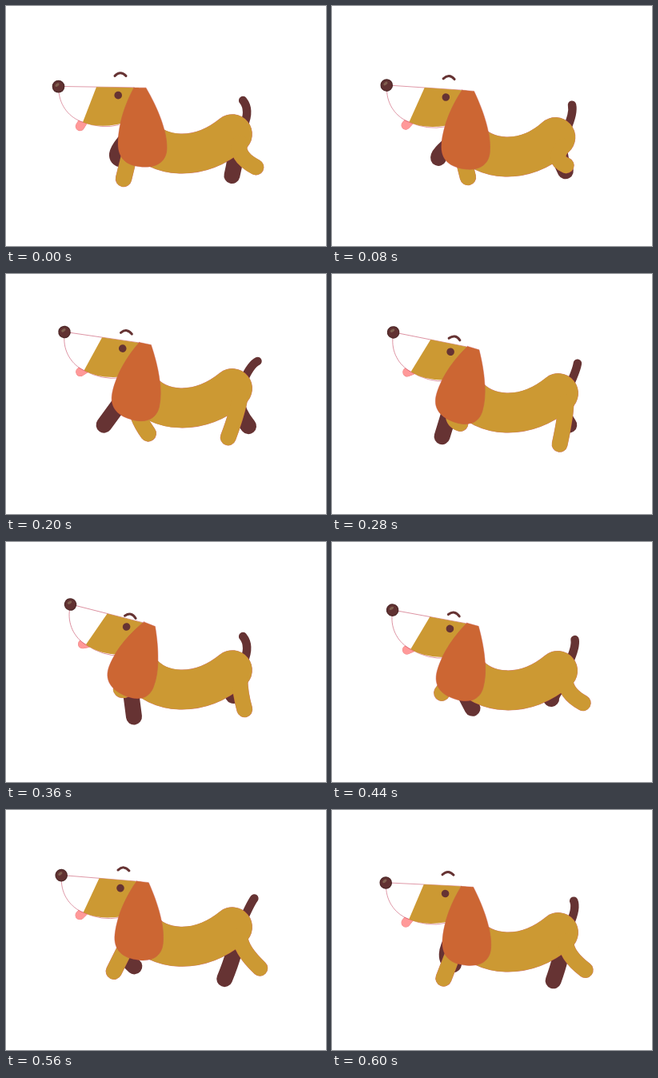
An HTML page with a canvas for the animation above (0.64 s loop, 400 by 300 pixels).

```html
<!DOCTYPE html>
<html lang="en">
<head>
<meta charset="utf-8">
<title>Walking dachshund</title>
<style>
  html, body { margin: 0; width: 100%; height: 100%; overflow: hidden; background: #fff; }
  canvas { display: block; width: 400px; height: 300px; }
</style>
</head>
<body>
<canvas id="stage" width="400" height="300"></canvas>
<script>
const ctx = document.getElementById('stage').getContext('2d');
const LOOP = 640, STEP = 40, FIRST_STRIDE = 360;
const GOLD = '#cc9933', RUST = '#cc6633', DARK = '#663333', PINK = '#ff9999';
const EDGE = 'rgba(190,50,80,0.7)';

// Each foot runs round a closed curve through five evenly timed points.
const NEAR_HIND = [[312.5, 201.5], [279, 199], [285.5, 213], [311, 203], [317, 197]];
const FAR_HIND = [[284, 192], [272, 198.5], [275, 213], [291, 207], [303, 189]];
const NEAR_FORE = [[147, 216], [183, 208], [159, 186], [140, 187.5], [133, 196]];
const FAR_FORE = [[160, 218.5], [177, 202.5], [155, 194], [134, 190], [123.5, 190]];

const wave = turns => Math.cos(turns * 2 * Math.PI);
const bump = turns => Math.max(0, wave(turns));
const frac = x => x - Math.floor(x);

// Position on a closed Catmull-Rom curve, phase 0..1.
function along(points, phase) {
  const n = points.length, i = Math.floor(phase * n), u = phase * n - i;
  const at = k => points[(i + k + n) % n];
  return [0, 1].map(c => {
    const [p, a, b, q] = [at(-1)[c], at(0)[c], at(1)[c], at(2)[c]];
    return a + u / 2 * (b - p + u * (2 * p - 5 * a + 4 * b - q + u * (3 * (a - b) + q - p)));
  });
}

// Quick drop, slower rise, once per stride.
function bobAt(stride) {
  const peak = 0.19, drop = 0.36;
  const s = frac(stride - peak);
  const turns = s < drop ? s / drop / 2 : 0.5 + (s - drop) / (1 - drop) / 2;
  return -6.25 + 10.75 * wave(turns);
}

function stroke(path, color, width) {
  ctx.strokeStyle = color;
  ctx.lineWidth = width;
  ctx.stroke(path);
}

function fill(path, color) {
  ctx.fillStyle = color;
  ctx.fill(path);
}

function dot(x, y, r, color) {
  const p = new Path2D();
  p.arc(x, y, r, 0, 7);
  fill(p, color);
}

function turn(deg, x, y) {
  ctx.translate(x, y);
  ctx.rotate(deg * Math.PI / 180);
  ctx.translate(-x, -y);
}

const bend = (x, y, kx, ky, fx, fy) => new Path2D(`M${x} ${y}Q${kx} ${ky} ${fx} ${fy}`);

function hindLeg(x, y, points, phase) {
  const knee = -14 * bump(phase - 0.12) ** 3;
  return bend(x, y, x + knee, y + 17, ...along(points, phase));
}

function foreLeg(x, y, points, phase) {
  const [fx, fy] = along(points, phase);
  const knee = 18 * bump(phase - 0.47);
  return bend(x, y, (x + fx) / 2 - knee, (y + fy) / 2 + knee * 0.6, fx, fy);
}

const MUZZLE = new Path2D('M65 100L114 101L97 145C80 140 67 125 66 106Z');
const OUTLINE = new Path2D('M160 101.7L65 100.3M66 106C67 125 80 140 96 145Q120 154 141 148.5');
const FACE = new Path2D('M113 101L166 102L158 143Q120 155 96 145Z');
const EAR = new Path2D('M160 102L175 102C190 128 201 155 201 177C201 193 190 201 174 201C153 201 140 192 140 172C140 147 150 120 160 102Z');
const BROW = new Path2D('M136 87.2Q143 80 150 87.2');

function drawTongue(tilt) {
  const size = 1 - 0.025 * tilt;
  const tongue = new Path2D(`M97 143l${-4.5 * size} ${7.3 * size}`);
  ctx.save();
  turn(tilt * 2.6, 97, 143);
  stroke(tongue, '#e88080', 11.4);
  stroke(tongue, PINK, 10.8);
  ctx.restore();
}

function drawEar(tilt) {
  ctx.save();
  turn(tilt * 0.62, 170, 102);
  ctx.translate(0, 102);
  ctx.scale(1, 1 - tilt * 0.0035);
  ctx.translate(0, -102);
  stroke(EAR, EDGE, 0.5);
  fill(EAR, RUST);
  ctx.restore();
}

function drawNose() {
  dot(65.5, 100.5, 7.8, '#4f2929');
  dot(65.5, 100.5, 6.6, '#613232');
  const shine = new Path2D();
  shine.ellipse(64, 98.5, 3, 1.7, -0.7, 0, 7);
  fill(shine, '#80604f');
}

function drawHead(tilt, bob) {
  ctx.save();
  ctx.translate(tilt * 0.87, tilt * 0.2 + bob * 0.9);
  turn(tilt, 175, 102);
  drawTongue(tilt);
  fill(MUZZLE, '#fff');
  stroke(OUTLINE, EDGE, 0.7);
  fill(FACE, GOLD);
  drawNose();
  drawEar(tilt);
  dot(140.2, 111.5, 4.8, DARK);
  ctx.translate(-0.08 * tilt, 0.3 * tilt ** 1.4);
  stroke(BROW, DARK, 3);
  ctx.restore();
}

function draw(t) {
  // The two strides of a loop differ in length.
  const rise = t / FIRST_STRIDE, fall = (LOOP - t) / (LOOP - FIRST_STRIDE);
  const near = t < FIRST_STRIDE ? rise / 2 : 1 - fall / 2;
  const far = frac(near + 0.5), stride = frac(near * 2);
  const tilt = 13.4 * Math.min(rise, fall);
  const bob = bobAt(stride);
  const rump = 283 - 0.9 * Math.max(0, bob);
  const wag = wave(stride - 0.06);

  ctx.clearRect(0, 0, 400, 300);
  ctx.lineCap = ctx.lineJoin = 'round';
  ctx.save();
  ctx.translate(0, bob);
  stroke(bend(rump + 14, 150, rump + 23, 130, 305 - 9.5 * wag, 121.8 - 4.2 * wag), DARK, 10.5);
  ctx.restore();

  stroke(hindLeg(rump + 5, 172 + bob, FAR_HIND, far), DARK, 20);
  stroke(foreLeg(153, 164 + bob, FAR_FORE, far), DARK, 20);

  const gold = [
    [new Path2D(`M167 ${160 + bob}C190 ${190 + bob} 240 ${195 + bob} ${rump} ${160 + bob}`), 49.5],
    [hindLeg(rump + 9.5, 171 + bob, NEAR_HIND, near), 19.5],
    [foreLeg(159, 167 + bob, NEAR_FORE, near), 20]
  ];
  gold.forEach(([path, width]) => stroke(path, EDGE, width + 0.5));
  gold.forEach(([path, width]) => stroke(path, GOLD, width));

  drawHead(tilt, bob);
}

const start = performance.now();
function tick() {
  const t = Math.max(0, performance.now() - start) % LOOP;
  draw(Math.floor(t / STEP) * STEP);
  requestAnimationFrame(tick);
}
tick();
</script>
</body>
</html>
```
